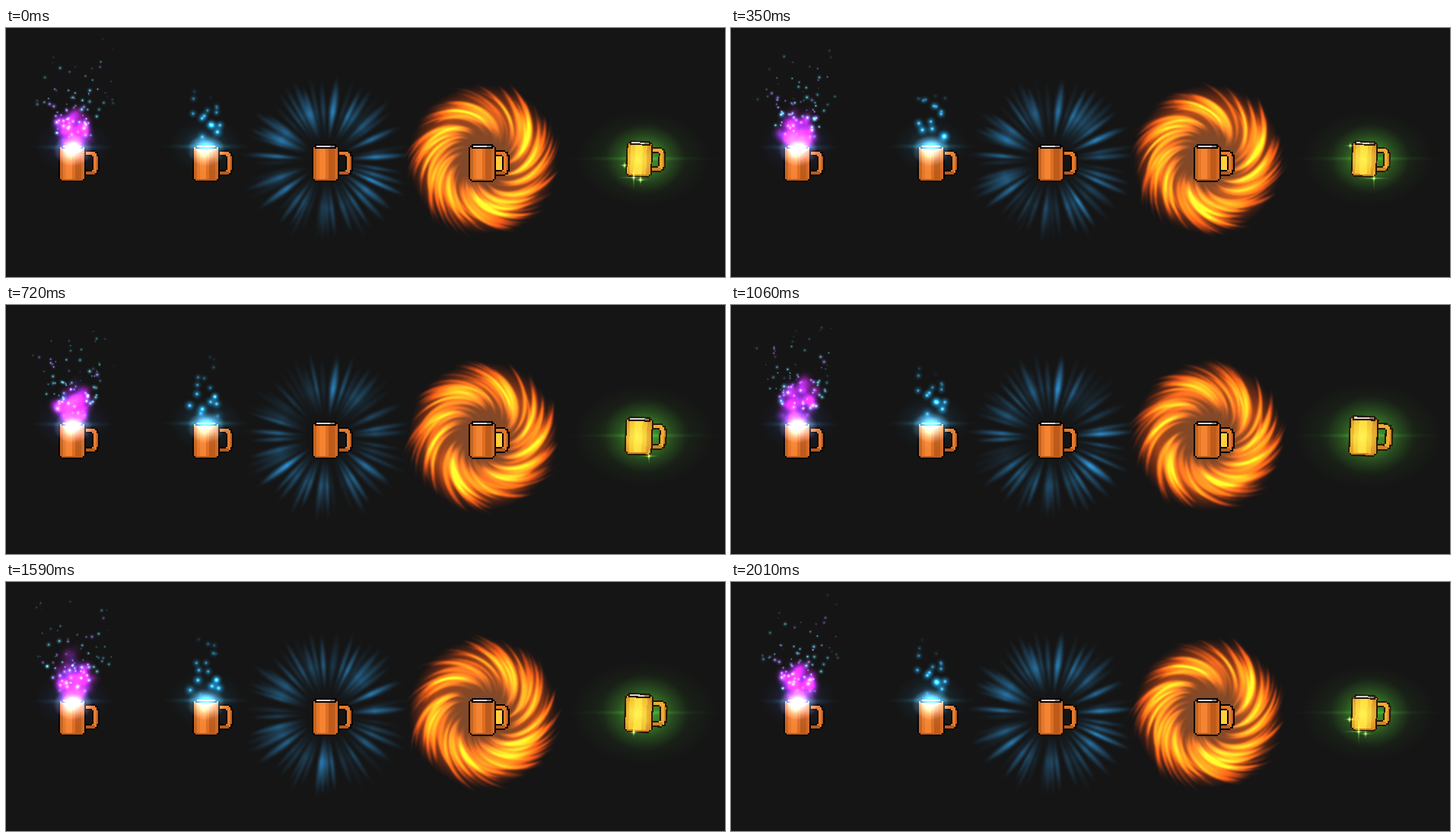
An HTML page with a canvas for the animation above (2040 ms loop, 945x328 px).

```html
<!DOCTYPE html>
<html lang="en">
<head>
<meta charset="utf-8">
<title>Mug effects</title>
<style>
  html, body { margin: 0; width: 100%; height: 100%; overflow: hidden; background: #151515; }
  canvas { display: block; }
</style>
</head>
<body>
<canvas id="stage" width="945" height="328"></canvas>
<script>
const LOOP = 2040, STEP = 51, TAU = Math.PI * 2;
const ctx = document.getElementById('stage').getContext('2d');

const rnd = (i, k) => {
  const v = Math.sin(i * 127.1 + k * 311.7) * 43758.5453;
  return v - Math.floor(v);
};
const spread = (i, k) => rnd(i, k) * 2 - 1;
const wave = (p, shift = 0) => Math.sin(TAU * (p + shift));
const bell = u => Math.sin(Math.PI * u);

function makeCanvas(width, height) {
  const canvas = document.createElement('canvas');
  canvas.width = width;
  canvas.height = height;
  return canvas;
}

// Mug sprite on a 27 x 25 grid, shown at two pixels per cell.
function makeMug(stripes, handle, shade, lit) {
  const sprite = makeCanvas(27, 25);
  const g = sprite.getContext('2d');
  const box = (color, x, y, w, h) => { g.fillStyle = color; g.fillRect(x, y, w, h); };
  const ink = lit ? '#2a1a05' : '#0a0403';

  box(ink, 17, 4, 7, 17);
  box(ink, 17, 5, 9, 15);
  box(ink, 17, 7, 10, 11);
  box(handle, 17, 5, 7, 15);
  box(handle, 17, 6, 8, 13);
  box(handle, 17, 8, 9, 9);
  box(shade, 17, 18, 7, 2);
  box(shade, 25, 8, 1, 9);
  box(ink, 17, 7, 5, 11);
  box(ink, 17, 8, 6, 9);
  g.clearRect(18, 8, 4, 9);

  box(ink, 0, 2, 18, 21);
  box(ink, 1, 1, 16, 23);
  box(ink, 2, 0, 14, 25);
  stripes.forEach(([color, x, w]) => box(color, x, 2, w, 21));
  box(shade, 2, 23, 14, 1);
  box(ink, 2, 2, 14, 1);
  box('#d6d3d8', 3, 1, 9, 1);
  box('#88868e', 12, 1, 3, 1);
  if (lit) {
    const light = g.createRadialGradient(8, 13, 0, 8, 13, 14);
    light.addColorStop(0, 'rgba(255,250,90,.8)');
    light.addColorStop(1, 'rgba(255,220,50,0)');
    g.globalCompositeOperation = 'source-atop';
    g.fillStyle = light;
    g.fillRect(1, 3, 16, 20);
  }
  return sprite;
}

const orangeMug = makeMug(
  [['#c56520', 1, 2], ['#e6782a', 3, 2], ['#f48432', 5, 4], ['#dc6d22', 9, 2], ['#bd5b1b', 11, 4], ['#d16a25', 15, 2]],
  '#e47a2d', '#b75b20');
const yellowMug = makeMug(
  [['#dc9228', 1, 2], ['#f2bd32', 3, 3], ['#ffdc42', 6, 5], ['#efb831', 11, 3], ['#d88b2a', 14, 3]],
  '#f0ac30', '#cc852b', true);

function drawMug(sprite, cx, cy, scale = 1, tilt = 0) {
  ctx.save();
  ctx.translate(cx, cy);
  ctx.rotate(tilt);
  ctx.scale(scale, scale);
  ctx.drawImage(sprite, -27, -25, 54, 50);
  ctx.restore();
}

function radial(radius, stops) {
  const gradient = ctx.createRadialGradient(0, 0, 0, 0, 0, radius);
  stops.forEach(([at, color]) => gradient.addColorStop(at, color));
  return gradient;
}

const SHARP = [1, .5, .14, 0], BROAD = [1, .78, .3, 0];

function glow(x, y, rx, ry, rgb, alpha, falloff = SHARP) {
  ctx.save();
  ctx.translate(x, y);
  ctx.scale(1, ry / rx);
  ctx.fillStyle = radial(rx, falloff.map((f, i) => [i / 3, `rgba(${rgb},${alpha * f})`]));
  ctx.fillRect(-rx, -rx, rx * 2, rx * 2);
  ctx.restore();
}

function dot(x, y, r, rgb, alpha) {
  glow(x, y, r * 2.5, r * 2.5, rgb, alpha);
  glow(x, y, r, r, '170,230,255', alpha * .6);
}

// Paints around a centre on a layer, then adds it to the stage blurred.
const layer = makeCanvas(280, 280);
function softly(cx, cy, blur, paint) {
  const g = layer.getContext('2d');
  g.setTransform(1, 0, 0, 1, 0, 0);
  g.clearRect(0, 0, 280, 280);
  g.translate(140, 140);
  g.globalCompositeOperation = 'lighter';
  paint(g);
  ctx.filter = `blur(${blur}px)`;
  ctx.drawImage(layer, cx - 140, cy - 140);
  ctx.filter = 'none';
}

// Tapered sliver from radius r0 to r1, bent by twist; nested for soft edges.
function blade(g, angle, r0, r1, width, twist, alpha) {
  const n = 14;
  g.globalAlpha = alpha;
  for (const inset of [1, .65, .3]) {
    g.beginPath();
    for (let i = 0; i <= n * 2; i++) {
      const side = i <= n ? 1 : -1;
      const s = (side > 0 ? i : n * 2 - i) / n;
      const r = r0 + (r1 - r0) * s;
      const a = angle - twist * s + side * inset * width * bell(Math.pow(s, 1.3)) / r;
      g.lineTo(r * Math.cos(a), r * Math.sin(a));
    }
    g.fill();
  }
  g.globalAlpha = 1;
}

function magicSmoke(p) {
  glow(88, 157, 56, 5, '40,150,190', .45);
  glow(88, 154, 50, 38, '50,70,190', .5);
  for (let i = 0; i < 70; i++) {
    const u = (p * 2 + rnd(i, 1)) % 1;
    const reach = 62 + 13 * wave(p, -.4);
    const x = 89 + spread(i, 2) * (11 + 11 * bell(u)) + 4 * wave(p + u);
    const y = 155 - u * reach * (.5 + .5 * rnd(i, 3));
    glow(x, y, 12, 12, i % 4 ? '215,25,255' : '120,45,255', .4 * bell(.1 + u * .85));
  }
  for (let i = 0; i < 80; i++) {
    const u = (p + rnd(i, 4)) % 1;
    const rise = 55 + 90 * Math.pow(rnd(i, 5), 2);
    const x = 88 + spread(i, 6) * (18 + 42 * u) + 4 * wave(u, rnd(i, 7));
    const y = 150 - rise * Math.pow(u, .7);
    const tint = i % 3 ? '70,190,225' : '150,105,255';
    dot(x, y, (1 + 1.7 * rnd(i, 8)) * (1 - u * .45), tint, .95 * Math.pow(1 - u, .6) * Math.min(1, u * 8));
  }
  glow(88, 161, 26, 21, '190,200,225', .8, BROAD);
  glow(88, 157, 17, 9, '255,240,255', .5 + .12 * wave(p * 3), BROAD);
}

function bubbles(p) {
  glow(263, 156, 60, 5, '30,145,180', .5);
  glow(263, 155, 48, 36, '20,105,150', .55);
  glow(263, 154, 25, 11, '30,150,215', .6, BROAD);
  glow(263, 161, 25, 21, '150,180,200', .75, BROAD);
  for (let i = 0; i < 16; i++) {
    const u = (p * 2 + (i + rnd(i, 11)) / 16) % 1;
    const x = 266 + spread(i, 12) * 24 + 3 * wave(u, rnd(i, 13));
    const y = 149 - u * (52 + 34 * rnd(i, 14));
    dot(x, y, 4.1 * (1 - u * .55), '15,165,245', Math.min(1, u * 7) * Math.pow(1 - u, .7));
  }
}

function rays(p) {
  softly(421, 174, 1.6, g => {
    g.fillStyle = radial(116, [[0, 'rgba(15,85,130,0)'], [.22, 'rgba(15,85,130,.03)'],
      [.55, 'rgba(22,108,165,.27)'], [.75, 'rgba(18,90,140,.17)'], [1, 'rgba(15,75,120,0)']]);
    for (let i = 0; i < 54; i++) {
      const angle = TAU * (i + spread(i, 21) * .7) / 54;
      const flicker = .5 + .5 * wave(p * (1 + i % 2), rnd(i, 22));
      blade(g, angle, 22, 98 + 24 * rnd(i, 23), 2 + 3.6 * rnd(i, 24), 0, .2 + .75 * flicker);
    }
  });
}

function fireSwirl(p) {
  const arms = 6, turn = TAU * 2 / arms;
  softly(627, 173, 1.3, g => {
    g.fillStyle = radial(98, [[0, 'rgba(125,70,35,.8)'], [.4, 'rgba(150,66,20,.75)'],
      [.68, 'rgba(205,70,8,.7)'], [.85, 'rgba(185,48,0,.38)'], [1, 'rgba(150,30,0,0)']]);
    g.fillRect(-98, -98, 196, 196);
    g.fillStyle = radial(110, [[0, 'rgba(150,70,20,0)'], [.25, 'rgba(190,85,20,.07)'],
      [.48, 'rgba(255,115,12,.18)'], [.68, 'rgba(255,112,10,.23)'],
      [.84, 'rgba(255,72,6,.22)'], [1, 'rgba(220,40,0,0)']]);
    for (let i = 0; i < 132; i++) {
      const phase = rnd(i, 31);
      const u = (p + phase) % 1;
      const base = TAU * (i % arms) / arms + spread(i, 32) * .42;
      const reach = 80 + 28 * rnd(i, 33);
      const width = 2.5 + 7.5 * Math.pow(rnd(i, 35), 1.6);
      blade(g, base + turn * (u - phase), 24 + 16 * rnd(i, 34), reach, width, 1.3, bell(u));
    }
  });
}

const twinkles = [ // x, y, middle of life, half life, size
  [834, 200, 0, 160, 12], [845, 198, 350, 240, 25], [814, 155, 370, 180, 10],
  [845, 199, 740, 180, 16], [825, 198, 1600, 180, 12], [825, 197, 2010, 190, 25], [813, 181, 2000, 160, 9]
];

function sparkle(t) {
  for (const [x, y, middle, half, size] of twinkles) {
    const gap = Math.abs(t - middle);
    const power = 1 - Math.min(gap, LOOP - gap) / half;
    if (power <= 0) continue;
    glow(x, y, size, 1.2, '150,225,90', power * .8);
    glow(x, y, 1.3, size * .7, '180,235,100', power * .8);
    glow(x, y, 4, 4, '220,255,130', power * .7);
  }
}

function greenAura(swell) {
  const size = 1 + .07 * swell;
  glow(838, 172, 92 * size, 66 * size, '48,140,24', .55);
  glow(840, 172, 54 * size, 50 * size, '45,130,28', .55, BROAD);
  glow(838, 172, 104, 4, '45,145,40', .35);
}

function draw(t) {
  const p = t / LOOP;
  const swell = -Math.cos(TAU * (t - 200) / LOOP);
  ctx.globalCompositeOperation = 'source-over';
  ctx.fillStyle = '#151515';
  ctx.fillRect(0, 0, 945, 328);
  ctx.imageSmoothingEnabled = false;

  ctx.globalCompositeOperation = 'lighter';
  rays(p);
  fireSwirl(p);
  greenAura(swell);

  ctx.globalCompositeOperation = 'source-over';
  ctx.fillStyle = '#ffcf3c';
  ctx.fillRect(644, 169, 8, 18);
  [96, 272, 429, 635].forEach(x => drawMug(orangeMug, x, 178));
  drawMug(yellowMug, 841, 173, 1.02 + .07 * swell, .04);

  ctx.globalCompositeOperation = 'lighter';
  magicSmoke(p);
  bubbles(p);
  sparkle(t);
}

const start = performance.now();
function tick() {
  const t = (performance.now() - start) % LOOP;
  draw(Math.floor(t / STEP) * STEP);
  requestAnimationFrame(tick);
}
tick();
</script>
</body>
</html>
```
